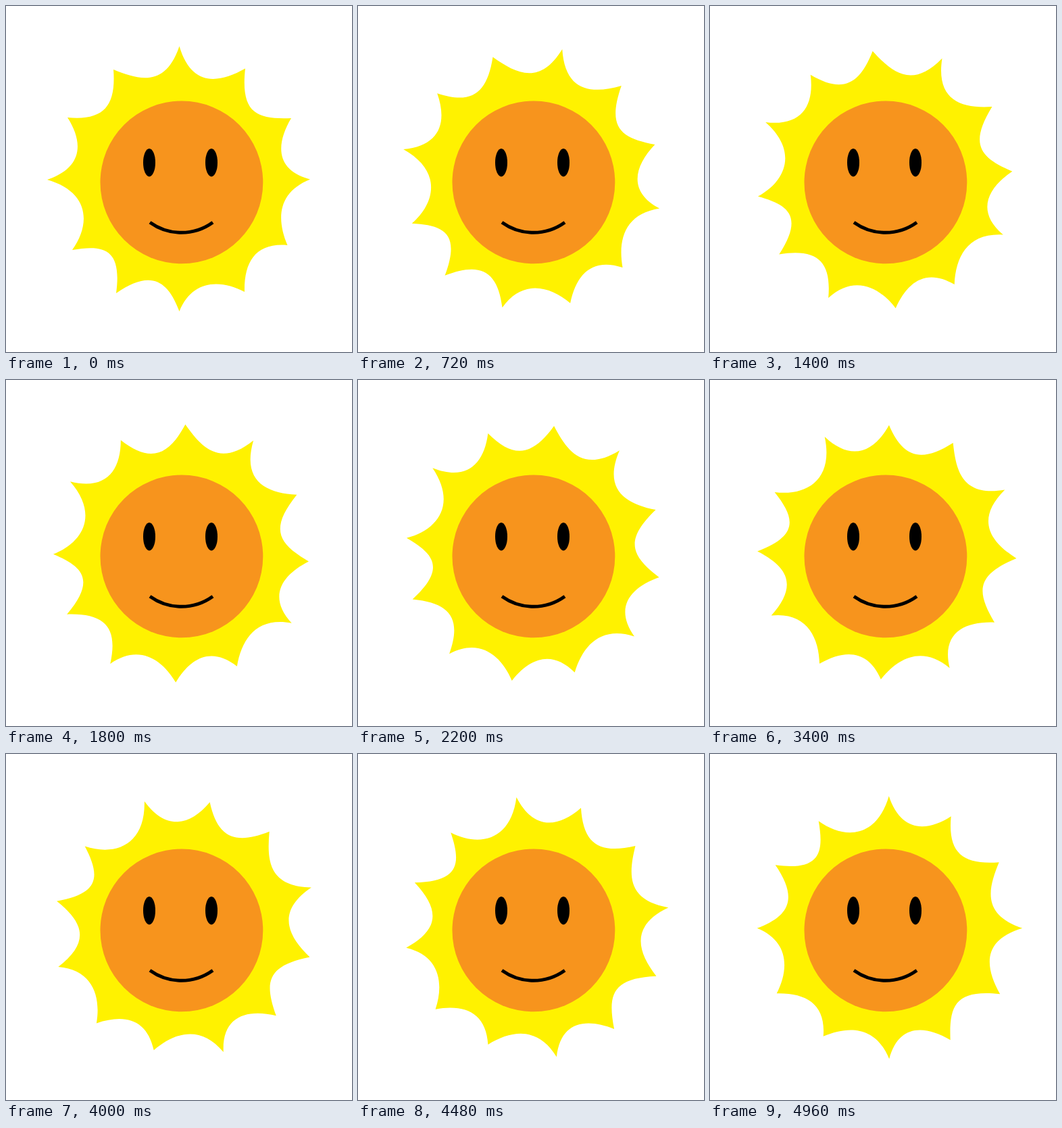
An HTML page for the animation above (5000 ms loop, 512 by 512 pixels).

```html
<!DOCTYPE html>
<html lang="en">
<head>
<meta charset="utf-8">
<title>Sun</title>
<style>
  html, body { margin: 0; width: 100%; height: 100%; overflow: hidden; background: #fff; }
  svg { display: block; width: 100%; height: 100%; }
</style>
</head>
<body>
<svg viewBox="0 0 512 512">
  <path id="rays" fill="#fff200" d="M159 94
    C198 110 236 120 256.5 59.5
    C274 118 312 116 354 92.5
    C347 158 370 168 422 166
    C399 205 399 243 450 256.5
    C402 276 400 315 416.5 354
    C370 350 352 378 353 423
    C318 405 276 404 256.5 452
    C238 402 211 392 163 425
    C172 358 144 353 98 361
    C126 322 123 275 61 257
    C112 240 116 204 91 165
    C145 170 163 148 159 94Z"/>
  <circle cx="259.9" cy="260.9" r="120.4" fill="#f7941d"/>
  <ellipse cx="212" cy="231.7" rx="9" ry="20.7"/>
  <ellipse cx="304" cy="231.7" rx="9" ry="20.7"/>
  <path d="M213 320.2C241 340.3 278 340.3 306 320.2" fill="none" stroke="#000" stroke-width="5"/>
</svg>
<script>
  const LOOP = 5000, STEP = 40, TURN = 90;
  const last = LOOP / STEP - 1;
  const rays = document.getElementById('rays');
  const start = performance.now();

  // A steady quarter turn in 40 ms steps, then a jump back.
  function draw(ms) {
    const step = Math.floor((ms % LOOP) / STEP);
    rays.setAttribute('transform', `rotate(${TURN * step / last} 260.2 261.5)`);
  }

  function tick(now) {
    draw(Math.max(0, now - start));
    requestAnimationFrame(tick);
  }

  draw(0);
  requestAnimationFrame(tick);
</script>
</body>
</html>
```
